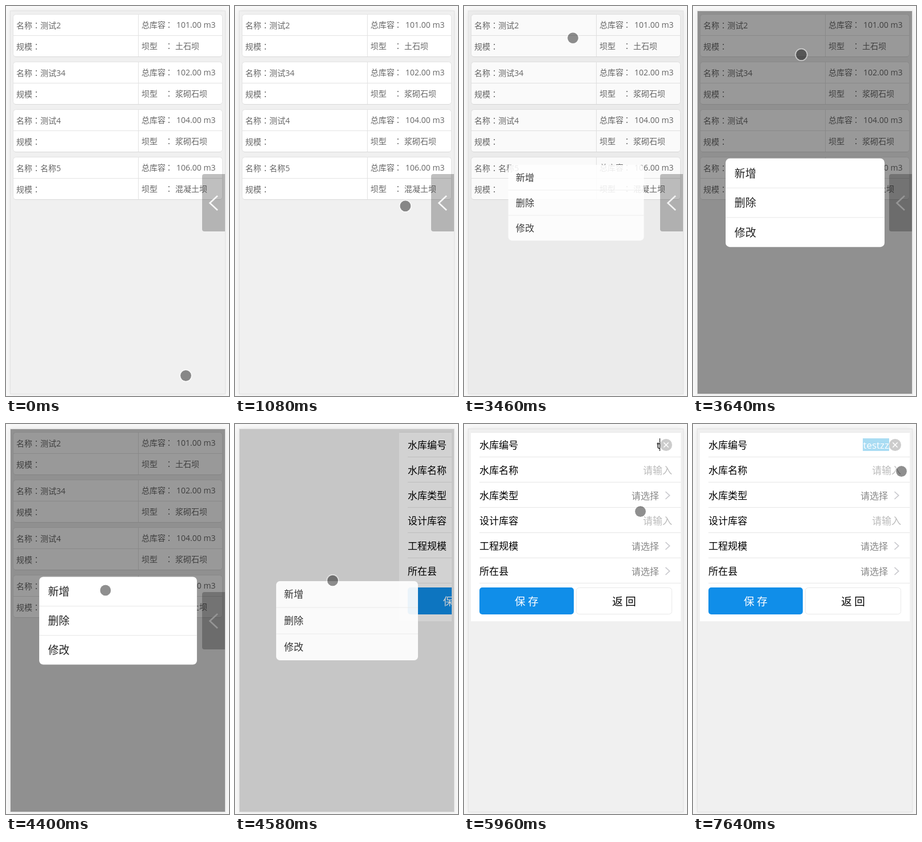
These frames come from a looping animation (390 by 680 pixels, 8 s). An HTML page with a canvas:

```html
<!DOCTYPE html>
<html lang="zh-CN">
<head>
<meta charset="utf-8">
<style>
html, body { margin: 0; width: 100%; height: 100%; overflow: hidden; background: #f8f8f8; }
canvas { display: block; width: 390px; height: 680px; }
</style>
</head>
<body>
<canvas id="stage"></canvas>
<script>
const LOOP = 8000, W = 390, H = 680;
const FONT = '"Open Sans", "Noto Sans CJK SC", "Noto Sans CJK JP", sans-serif';
const COLON_FONT = '"Noto Sans CJK JP", sans-serif';
const BLUE = '#108ee9', SELECTED = '#a9dcf3';

const canvas = document.getElementById('stage');
const c = canvas.getContext('2d');
const dpr = window.devicePixelRatio || 1;
canvas.width = W * dpr;
canvas.height = H * dpr;

// Easing and timing
function bezier(x1, y1, x2, y2) {
  const at = (s, a, b) => 3 * (1 - s) ** 2 * s * a + 3 * (1 - s) * s * s * b + s ** 3;
  return x => {
    if (x <= 0) return 0;
    if (x >= 1) return 1;
    let lo = 0, hi = 1;
    for (let i = 0; i < 24; i++) {
      const mid = (lo + hi) / 2;
      if (at(mid, x1, x2) < x) lo = mid; else hi = mid;
    }
    return at(lo, y1, y2);
  };
}
const backOut = bezier(.18, .89, .32, 1.28);
const backIn = bezier(.6, -.3, .74, .05);
const fade = bezier(.55, 0, .55, .2);
const ease = bezier(.25, .1, .25, 1);
const span = (t, start, length) => Math.min(1, Math.max(0, (t - start) / length));

// Pointer path: time, x, y
const path = [
  [0, 314.5, 644.5], [69, 314.5, 644.5], [70, 264, 369], [129, 264, 369], [130, 285, 391],
  [359, 285, 391], [450, 264, 369], [1040, 264, 369], [1180, 380, 300], [1370, 330, 120],
  [1570, 330, 120], [1770, 280.5, 34.5], [2170, 280.5, 34.5], [2380, 190.5, 55.5],
  [3460, 190.5, 55.5], [3640, 189.5, 84.5], [4250, 174, 290], [4400, 174, 290],
  [4580, 170.5, 273.5], [5130, 344, 40], [5400, 344, 40], [5700, 301, 125],
  [5960, 308.5, 152.5], [6040, 310, 149], [6100, 310, 149], [6700, 364.5, 82.5], [8000, 364.5, 82.5]
];
function pointerAt(t) {
  const i = Math.max(1, path.findIndex(p => p[0] > t));
  const a = path[i - 1], b = path[i], k = span(t, a[0], b[0] - a[0]);
  return [a[1] + (b[1] - a[1]) * k, a[2] + (b[2] - a[2]) * k];
}

// Drawing helpers; text is placed by its vertical centre
function text(str, x, y, size, color, align = 'left', family = FONT, weight = 400) {
  c.font = `${weight} ${size}px ${family}`;
  c.fillStyle = color;
  c.textAlign = align;
  c.fillText(str, x, Math.round(y + size * .37));
}
function line(color, width, ...pts) {
  c.beginPath();
  pts.forEach(([x, y], i) => i ? c.lineTo(x, y) : c.moveTo(x, y));
  c.strokeStyle = color;
  c.lineWidth = width;
  c.stroke();
}
function box(x, y, w, h, r, fill, stroke) {
  c.beginPath();
  c.roundRect(x, y, w, h, r);
  if (fill) { c.fillStyle = fill; c.fill(); }
  if (stroke) { c.strokeStyle = stroke; c.lineWidth = 1; c.stroke(); }
}
function disc(x, y, r, fill) {
  c.beginPath();
  c.arc(x, y, r, 0, Math.PI * 2);
  c.fillStyle = fill;
  c.fill();
}
function rect(x, y, w, h, fill) {
  c.fillStyle = fill;
  c.fillRect(x, y, w, h);
}

function drawFrame() {
  rect(0, 0, W, H, '#f9f9f9');
  c.save();
  c.shadowColor = 'rgba(0,0,0,.08)';
  c.shadowBlur = 10 * dpr;
  rect(7, 8, 377, 669, '#e2e2e2');
  c.restore();
  rect(8, 9, 375, 667, '#f0f0f0');
}

const cards = [
  ['测试2', '101.00 m3', '土石坝'],
  ['测试34', '102.00 m3', '浆砌石坝'],
  ['测试4', '104.00 m3', '浆砌石坝'],
  ['名称5', '106.00 m3', '混凝土坝']
];
function drawCard([name, volume, type], i, selected) {
  const y = 14 + i * 83, ink = '#666';
  const put = (str, x, dy, family) => text(str, x, y + dy, 14, ink, 'left', family);
  box(12.5, y + .5, 366, 74, 5, '#fff', '#e3e3e3');
  line('#d9d9d9', 1, [16, y + 74.5], [375, y + 74.5]);
  line('#e3e3e3', 1, [13, y + 37.5], [378, y + 37.5]);
  line('#e3e3e3', 1, [231.5, y + 1], [231.5, y + 74]);
  if (selected) {
    rect(18, y + 11, name.length * 14 + 36, 18, SELECTED);
    rect(18, y + 48, 42, 18, SELECTED);
    rect(237, y + 10, 132, 18, SELECTED);
    rect(237, y + 47, 59 + type.length * 14, 18, SELECTED);
  }
  put('名称', 18, 20);
  put('：', 46, 20, COLON_FONT);
  put(name, 60, 20);
  put('规模', 18, 57);
  put('：', 46, 57, COLON_FONT);
  put('总库容', 237, 19);
  put('：', 278, 19, COLON_FONT);
  put(volume, 298, 19);
  put('坝型', 237, 56);
  put('：', 278, 56, COLON_FONT);
  put(type, 296, 56);
}
function drawList(t) {
  const selected = t >= 1250 && t < 1690;
  cards.forEach((card, i) => drawCard(card, i, selected));
  box(343, 293, 40, 100, [4, 0, 0, 4], 'rgba(0,0,0,.25)');
  if (selected) rect(343, 293, 40, 100, 'rgba(120,200,240,.4)');
  line('#f7f7f7', 2.6, [370, 331], [356.5, 343.5], [370, 356]);
}

// Value typed into the first field: start time, text
const typing = [[0, ''], [5930, 't'], [6150, 'te'], [6360, 'tes'], [6550, 'test'], [6700, 'testz'], [7410, 'testzz']];
function drawInput(t) {
  const value = typing.filter(k => k[0] <= t).pop()[1];
  const selected = t >= 7640 || (t >= 7180 && t < 7240);
  const right = value ? 343 : 364;
  if (!value) text('请输入', 364, 37, 17, '#bbb', 'right');
  if (value) {
    c.font = `17px ${FONT}`;
    const w = c.measureText(value).width;
    if (selected) rect(right - w - .5, 25, w + .5, 22, SELECTED);
    text(value, right, 36.5, 17, selected ? '#fff' : '#000', 'right');
    disc(353.5, 36.5, 10.5, '#ccc');
    line('#fff', 1.6, [349.3, 32.3], [357.7, 40.7]);
    line('#fff', 1.6, [357.7, 32.3], [349.3, 40.7]);
  }
  if (t >= 5300 && !selected) rect(right - 1, 25, 1, 22, '#000');
}

const fields = ['水库编号', '水库名称', '水库类型', '设计库容', '工程规模', '所在县'];
const picks = [2, 4, 5];
function drawForm(t) {
  const shift = Math.round(367 * (1 - ease(span(t, 4500, 450))));
  c.save();
  c.beginPath();
  c.rect(12, 14, 367, 331);
  c.clip();
  c.translate(shift, 0);
  rect(12, 14, 367, 330, '#fff');
  line('#e6e6e6', 1, [12, 14.5], [379, 14.5]);
  fields.forEach((label, i) => {
    const y = 37 + i * 44;
    text(label, 27, y, 17, '#000');
    line('#e6e6e6', 1, [27, y + 20.5], [379, y + 20.5]);
    if (picks.includes(i)) {
      text('请选择', 341, y, 16, '#888', 'right');
      line('#c7c7cc', 1.7, [352.5, y - 7], [359.5, y - .5], [352.5, y + 6]);
    } else if (i) {
      text('请输入', 364, y, 17, '#bbb', 'right');
    }
  });
  drawInput(t);
  box(27, 285, 165, 47, 5, BLUE);
  box(196.5, 285.5, 167, 46, 5, '#fff', '#e8e8e8');
  [['保', 98], ['存', 121]].forEach(([s, x]) => text(s, x, 309, 18.5, '#fff', 'center', FONT, 500));
  [['返', 268.5], ['回', 291.5]].forEach(([s, x]) => text(s, x, 309, 18.5, '#000', 'center'));
  c.restore();
}

function drawMenu(t) {
  const mask = .4 * (fade(span(t, 3365, 275)) - fade(span(t, 4379, 265)));
  if (mask > 0) rect(8, 9, 375, 667, `rgba(0,0,0,${mask})`);
  const scale = t < 4388 ? backOut(span(t, 3387, 275)) : 1 - backIn(span(t, 4388, 290));
  if (scale <= 0) return;
  c.save();
  c.globalAlpha = Math.min(1, scale);
  c.translate(196, 343);
  c.scale(scale, scale);
  box(-135, -75, 270, 150, 7, '#fff');
  ['新增', '删除', '修改'].forEach((label, i) => {
    const y = (i - 1) * 50;
    if (i) line('#e8e8e8', 1, [-135, y - 25], [135, y - 25]);
    c.font = `18.4px ${FONT}`;
    c.fillStyle = '#222';
    c.textAlign = 'left';
    c.fillText(label, -120, y + 7);
  });
  c.restore();
}

function drawPointer(t) {
  const [x, y] = pointerAt(t);
  disc(x, y, 9.5, 'rgba(0,0,0,.44)');
  c.beginPath();
  c.arc(x, y, 10.3, 0, Math.PI * 2);
  c.strokeStyle = 'rgba(255,255,255,.5)';
  c.lineWidth = 1.7;
  c.stroke();
}

function draw(t) {
  c.setTransform(dpr, 0, 0, dpr, 0, 0);
  drawFrame();
  if (t < 4450) drawList(t);
  else drawForm(t);
  drawMenu(t);
  drawPointer(t);
}

const begin = performance.now();
function tick() {
  draw((performance.now() - begin) % LOOP);
  requestAnimationFrame(tick);
}
tick();
</script>
</body>
</html>
```
